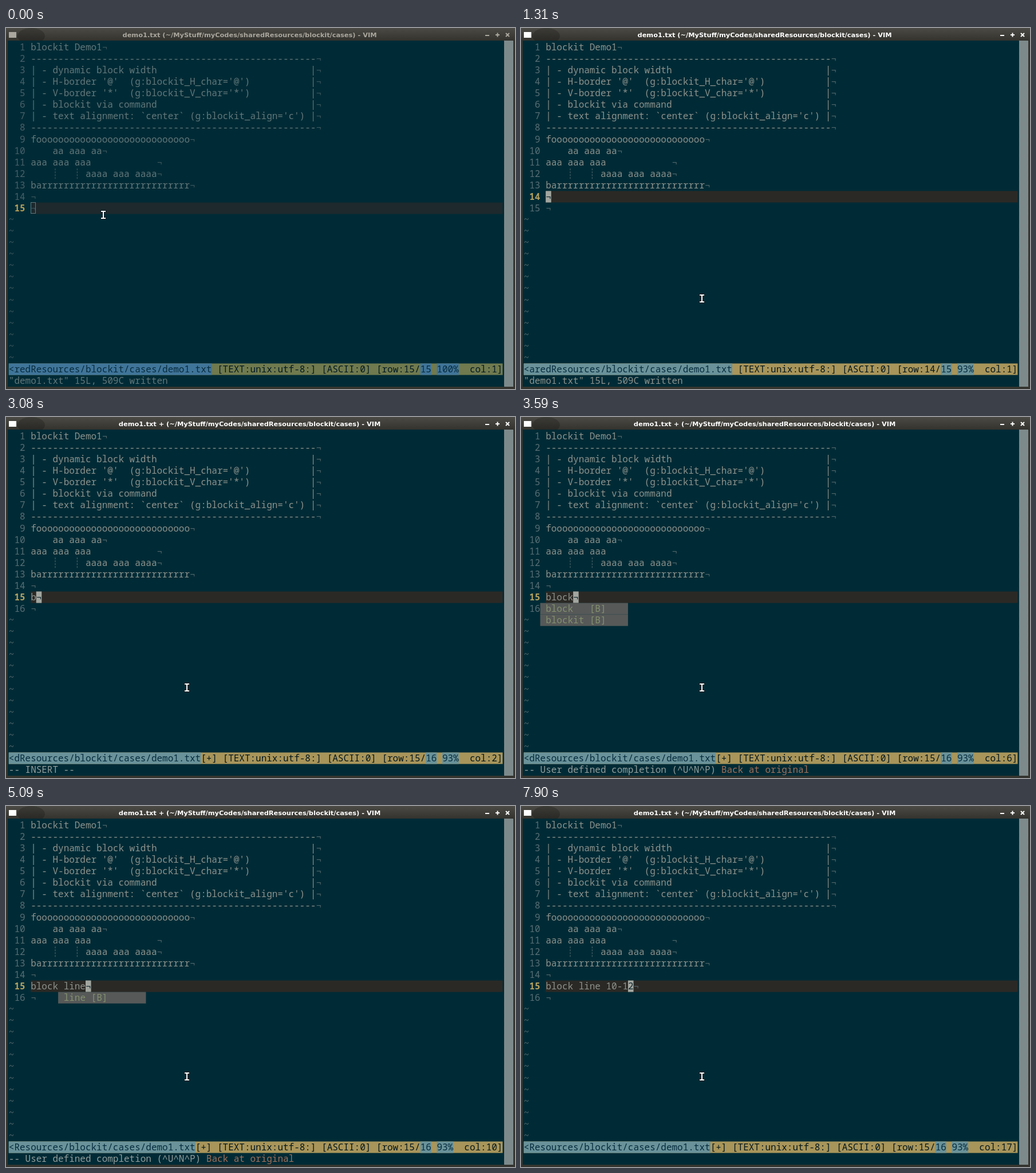
Animation, 889 px wide and 630 px high, one loop 8000 ms. Source, as an HTML page with a canvas:

```html
<!DOCTYPE html>
<html lang="en">
<head>
<meta charset="utf-8">
<title>Editor session</title>
<style>
html, body { margin: 0; width: 100%; height: 100%; overflow: hidden; background: #002b36; }
canvas { display: block; width: 889px; height: 630px; }
</style>
</head>
<body>
<canvas id="stage" width="889" height="630"></canvas>
<script>
const ctx = document.getElementById('stage').getContext('2d');
const LOOP = 8000, CELL = 9.585, ROW = 20.07, LEFT = 4.8, TOP = 23.5, GUTTER = 4, COLS = 90;
const MONO = '15.975px "Noto Sans Mono", monospace';
const PATH = '~/MyStuff/myCodes/sharedResources/blockit/cases/demo1.txt';

// Each entry: colour of the unfocused window, colour of the focused one
const PALETTE = {
  text: ['#62777a', '#8d928c'],
  number: ['#48606a', '#586e75'],
  current: ['#b59b54', '#b3a060'],
  faint: ['#3c565e', '#51666b'],
  line: ['#1d292d', '#2b2925'],
  file: ['#40759a', '#69929a'],
  info: ['#707a4e', '#a8955a'],
  ink: ['#021a22', '#06181c'],
  title: ['#aaa79e', '#ffffff'],
  frame: ['#35342f', '#35342f'],
};

const boxed = s => ('| - ' + s).padEnd(51) + '|';
const RULE = '-'.repeat(52);
const BUFFER = [
  'blockit Demo1',
  RULE,
  boxed('dynamic block width'),
  boxed("H-border '@'  (g:blockit_H_char='@')"),
  boxed("V-border '*'  (g:blockit_V_char='*')"),
  boxed('blockit via command'),
  boxed("text alignment: `center` (g:blockit_align='c')"),
  RULE,
  'f' + 'o'.repeat(28),
  '    aa aaa aa',
  'aaa aaa aaa'.padEnd(23),
  ' '.repeat(10) + 'aaaa aaa aaaa',
  'ba' + 'r'.repeat(27),
  '',
];

// Typing: time, text of the new line, column in the status bar, completion words
const BLOCK = ['block', 'blockit'];
const TYPING = [
  [1610, '', 1], [2230, 'b', 2], [2850, '', 1], [3080, 'b', 2],
  [3200, 'bl', 3, BLOCK], [3390, 'blo', 3, BLOCK],
  [3540, 'bloc', 5, BLOCK], [3590, 'block', 6, BLOCK],
  [4430, 'block ', 7], [4870, 'block l', 8],
  [4940, 'block li', 9, ['line']], [5020, 'block lin', 10, ['line']],
  [5090, 'block line', 10, ['line']], [5250, 'block line ', 12],
  [5520, 'block line 1', 13], [5650, 'block line 10', 14],
  [6090, 'block line 10-', 15], [6610, 'block line 10-1', 16],
  [6780, 'block line 10-12', 17],
];

function mix([a, b], k) {
  const channel = (hex, i) => parseInt(hex.slice(i, i + 2), 16);
  return `rgb(${[1, 3, 5].map(i => Math.round(channel(a, i) * (1 - k) + channel(b, i) * k))})`;
}

const rowY = row => TOP + (row - 1) * ROW;
const colX = col => LEFT + col * CELL;

function rect(x, y, w, h, color) {
  ctx.fillStyle = color;
  ctx.fillRect(x, y, w, h);
}

function fillCells(row, col, count, color) {
  rect(colX(col), rowY(row), count * CELL, ROW, color);
}

function write(row, col, text, color, bold) {
  ctx.font = (bold ? 'bold ' : '') + MONO;
  ctx.textAlign = 'left';
  ctx.fillStyle = color;
  ctx.fillText(text, colX(col), rowY(row) + 15.5);
}

const stipple = (() => {
  const tile = document.createElement('canvas');
  tile.width = tile.height = 2;
  const c = tile.getContext('2d');
  c.fillStyle = '#57666a';
  c.fillRect(0, 0, 2, 2);
  c.fillStyle = '#a3adad';
  c.fillRect(0, 0, 1, 1);
  c.fillRect(1, 1, 1, 1);
  return ctx.createPattern(tile, 'repeat');
})();

function drawWindow(color, modified) {
  rect(0, 0, 889, 630, color.frame);
  const bar = ctx.createLinearGradient(0, 0, 0, 22);
  bar.addColorStop(0, '#4b4a44');
  bar.addColorStop(1, '#34332e');
  rect(0, 0, 889, 22, bar);
  ctx.fillStyle = 'rgba(0, 0, 0, 0.2)';
  ctx.beginPath();
  ctx.ellipse(44, 14, 24, 14, 0, 0, 2 * Math.PI);
  ctx.fill();
  rect(3, 22, 867, 604, '#002b36');
  rect(870, 22, 16, 604, stipple);

  rect(5, 7, 13, 10, color.title);
  ctx.font = 'bold 11.37px "DejaVu Sans", sans-serif';
  ctx.textAlign = 'center';
  ctx.fillStyle = color.title;
  const folder = PATH.slice(0, PATH.lastIndexOf('/'));
  ctx.fillText(`demo1.txt ${modified ? '+ ' : ''}(${folder}) - VIM`, 425.5, 16);

  rect(837, 12, 7, 2, color.title);
  rect(855, 11, 7, 2, color.title);
  rect(857.5, 8.5, 2, 7, color.title);
  ctx.strokeStyle = color.title;
  ctx.lineWidth = 2;
  ctx.beginPath();
  ctx.moveTo(873, 9); ctx.lineTo(879, 15);
  ctx.moveTo(879, 9); ctx.lineTo(873, 15);
  ctx.stroke();
}

function drawBuffer(color, lines, current) {
  fillCells(current, GUTTER, COLS - GUTTER, color.line);
  lines.forEach((text, i) => {
    const row = i + 1, active = row === current;
    write(row, 0, String(row).padStart(3), active ? color.current : color.number, active);
    write(row, GUTTER, text, color.text);
    write(row, GUTTER + text.length, '¬', color.faint);
  });
  for (const col of [4, 8]) {
    for (let i = 0; i < 4; i++) {
      rect(colX(GUTTER + col) + 4, rowY(12) + 1 + i * 5, 1, 3, color.number);
    }
  }
  for (let row = lines.length + 1; row < 29; row++) write(row, 0, '~', color.faint);
}

function drawCursor(row, col, char, focused, color) {
  if (focused) {
    fillCells(row, GUTTER + col, 1, '#a2a6a0');
    write(row, GUTTER + col, char, '#10282e');
  } else {
    ctx.strokeStyle = color.text;
    ctx.lineWidth = 1;
    ctx.strokeRect(43.5, Math.round(rowY(row)) + 0.5, 8, 19);
  }
}

function drawStatus(color, row, total, column, modified) {
  const percent = Math.floor(row / total * 100) + '%';
  const info = `${modified ? '[+]' : ''} [TEXT:unix:utf-8:] [ASCII:0] [row:${row}/`;
  const tail = `  col:${column}]`;
  const room = COLS - (info + total + ' ' + percent + tail).length;
  const segments = [
    ['<' + PATH.slice(1 - room), 'file'], [info, 'info'], [String(total), 'file'],
    [' ', 'info'], [percent, 'file'], [tail, 'info'],
  ];
  let col = 0;
  fillCells(29, 0, COLS, color.info);
  for (const [text, fill] of segments) {
    if (fill === 'file') fillCells(29, col, text.length, color.file);
    write(29, col, text, fill === 'file' ? '#062c3e' : color.ink);
    col += text.length;
  }
}

function drawPopup(words, typed) {
  const start = GUTTER + typed.lastIndexOf(' ');
  const width = Math.max(...words.map(w => w.length));
  words.forEach((word, i) => {
    fillCells(16 + i, start, 16, '#565958');
    write(16 + i, start + 1, word.padEnd(width) + ' [B]', '#85906f');
  });
}

function drawPointer(x, y) {
  for (const [color, grow] of [['#0a1c22', 1], ['#ffffff', 0]]) {
    for (const [dx, dy, w, h] of [[-4, -7, 8, 2], [-1, -7, 2, 14], [-4, 5, 8, 2]]) {
      rect(x + dx - grow, y + dy - grow, w + 2 * grow, h + 2 * grow, color);
    }
  }
}

function draw(t) {
  const focus = t < 90 ? 0 : t < 140 ? 0.5 : 1;
  const color = {};
  for (const name in PALETTE) color[name] = mix(PALETTE[name], focus);

  const [, typed = '', column = 1, words] = TYPING.findLast(step => t >= step[0]) || [];
  const inserted = t >= 1610, normal = t >= 7900;
  const lines = inserted ? [...BUFFER, typed, ''] : [...BUFFER, ''];
  const row = t >= 1310 && !inserted ? 14 : 15;
  const cursor = typed.length - (normal ? 1 : 0);

  drawWindow(color, t >= 1650);
  drawBuffer(color, lines, row);
  drawCursor(row, cursor, typed[cursor] || '¬', focus > 0, color);
  drawStatus(color, row, lines.length, column, inserted);

  if (words) {
    drawPopup(words, typed);
    const message = '-- User defined completion (^U^N^P) ';
    write(30, 0, message, '#939d9b');
    write(30, message.length, 'Back at original', '#a0705a');
  } else if (!normal) {
    const message = inserted ? '-- INSERT --' : '"demo1.txt" 15L, 509C written';
    write(30, 0, message, inserted ? '#939d9b' : color.text);
  }

  const move = t < 380 ? 0 : Math.min(4, Math.floor((t - 380) / 40) + 1) / 4;
  drawPointer(170 + 146 * move, 326 + 146 * move);
}

function tick() {
  draw(performance.now() % LOOP);
  requestAnimationFrame(tick);
}
tick();
</script>
</body>
</html>
```
